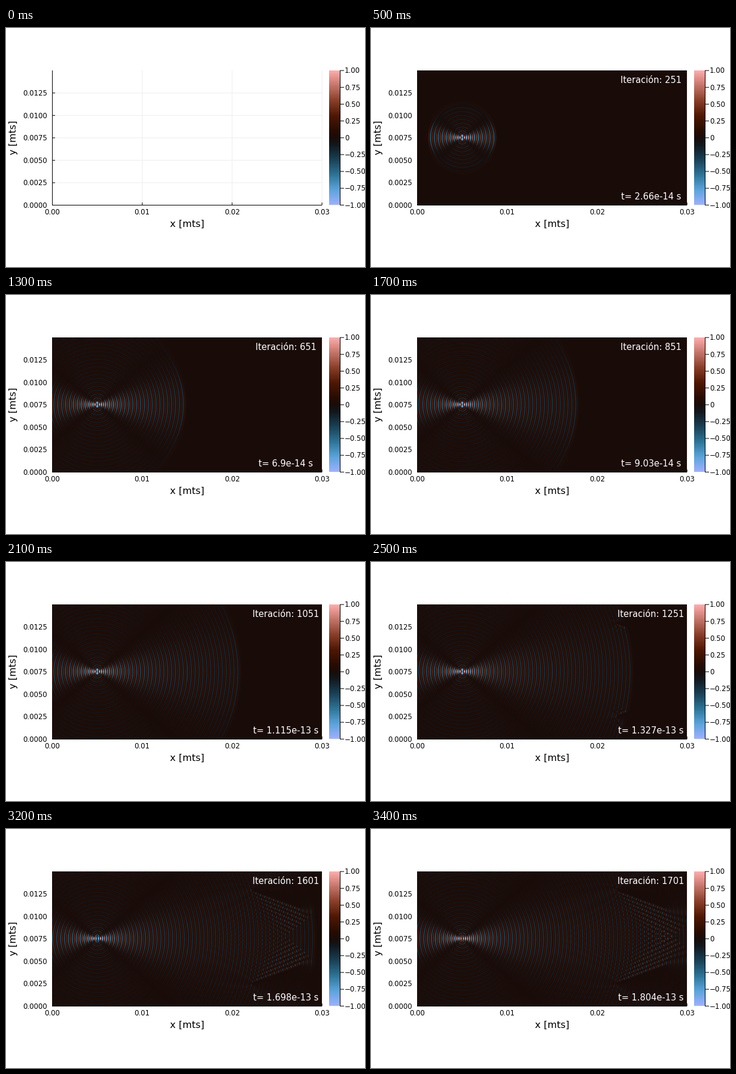
Animation of 600 by 400 pixels, one loop 3.5 s. Source, as a matplotlib script:

```python
import math

import numpy as np
import matplotlib.pyplot as plt
from matplotlib.animation import FuncAnimation
from matplotlib.colors import LinearSegmentedColormap

W, H, DPI = 600, 400, 100
FRAMES, INTERVAL, STRIDE = 35, 100, 50
LEFT, RIGHT, TOP, BOTTOM = 77, 528, 71, 296

DT = 1.5e-16 / math.sqrt(2)   # seconds per iteration
FREQ = 3.3e14
CELL = 0.5                    # pixels per grid cell
COURANT = 0.453
PAD = 40                      # absorbing margin, in cells
NX, NY = 900, 450
SRC_X, SRC_Y, SRC_HALF = 150, 225, 10

# horn walls in heatmap pixels: x0, y0, x1, y1
WALLS = [(333, 31, 413, 60), (333, 188, 413, 159)]

plt.rcParams["font.family"] = "DejaVu Sans"

STOPS = [(0, "#9eb0ff"), (1 / 9, "#5ba4db"), (2 / 9, "#2d7597"),
         (3 / 9, "#1a4256"), (4 / 9, "#11191e"), (0.5, "#190c09"),
         (5 / 9, "#280d01"), (6 / 9, "#501803"), (7 / 9, "#8a3f2a"),
         (8 / 9, "#c4756a"), (1, "#ffacac")]
CMAP = LinearSegmentedColormap.from_list("waves", STOPS, N=256)


def damping():
    """Per-step factor: sponge around the domain, zero on the horn walls."""
    i = np.arange(NX + 2 * PAD)[None, :] - PAD
    j = np.arange(NY + 2 * PAD)[:, None] - PAD
    dx = np.maximum(np.maximum(-i, i - NX + 1), 0)
    dy = np.maximum(np.maximum(-j, j - NY + 1), 0)
    g = np.exp(-(0.01 * np.hypot(dx, dy)) ** 2)
    x, y = (i + 0.5) * CELL, (j + 0.5) * CELL
    for x0, y0, x1, y1 in WALLS:
        wall = y0 + (x - x0) * (y1 - y0) / (x1 - x0)
        g[(np.abs(y - wall) < 0.9) & (x > x0) & (x < x1)] = 0
    return g.astype(np.float32)


def simulate():
    """Fourth-order wave equation driven by a short vertical line source."""
    g = damping()
    rows, cols = g.shape
    u = np.zeros((rows + 4, cols + 4), np.float32)
    prev = np.zeros_like(u)
    s2 = COURANT ** 2
    mid, near, far = 2 - 5 * s2, 4 * s2 / 3, -s2 / 12
    sy, sx = 2 + PAD + SRC_Y, 2 + PAD + SRC_X
    source = (slice(sy - SRC_HALF, sy + SRC_HALF), sx)
    shots = []
    for n in range(1, STRIDE * (FRAMES - 1) + 2):
        # only the columns the wave can have reached
        hi = min(cols, sx + n // 2 + 20)
        v, old = u[:, :hi + 4], prev[:, :hi + 4]
        now, nxt = v[2:-2, 2:-2], old[2:-2, 2:-2]
        ring1 = v[1:-3, 2:-2] + v[3:-1, 2:-2]
        ring1 += v[2:-2, 1:-3]
        ring1 += v[2:-2, 3:-1]
        ring2 = v[:-4, 2:-2] + v[4:, 2:-2]
        ring2 += v[2:-2, :-4]
        ring2 += v[2:-2, 4:]
        ring1 *= near
        ring2 *= far
        ring1 += ring2
        ring1 += mid * now
        np.subtract(ring1, nxt, out=nxt)
        prev[source] += 0.15 * math.cos(2 * math.pi * FREQ * DT * n)
        nxt *= g[:, :hi]
        now *= g[:, :hi]
        u, prev = prev, u
        if n % STRIDE == 1:
            shots.append(u[2 + PAD:2 + PAD + NY, 2 + PAD:2 + PAD + NX].copy())
    return shots


fields = simulate()

fig = plt.figure(figsize=(W / DPI, H / DPI), dpi=DPI, facecolor="white")
ax = fig.add_axes([0, 0, 1, 1])
ax.axis("off")


def px(size):
    return size * 72 / DPI


def label(x, y, s, size, ha="center", color="black"):
    """Text whose digits are centred on height y."""
    return ax.text(x, y + 0.364 * size, s, fontsize=px(size), ha=ha,
                   va="baseline", color=color, zorder=6)


def line(x0, y0, x1, y1, color="black", z=2):
    ax.plot([x0, x1], [y0, y1], color=color, lw=px(1), zorder=z,
            solid_capstyle="butt", snap=False)


TICK, GUIDE, NOTE = 11.73, 16.13, 14.67
GRID = "#eeeeee"

for k in range(4):
    x = 77.5 + 150.2 * k
    line(x, TOP, x, BOTTOM, GRID, 1)
    line(x, 292, x, BOTTOM + 0.5)
    label(x, 308, f"{k * 0.01:.2f}", TICK)
for k in range(6):
    y = 296.5 - 37.55 * k
    line(LEFT, y, RIGHT, y, GRID, 1)
    line(LEFT, y, 82, y)
    label(69, y, f"{k * 0.0025:.4f}", TICK, "right")
line(77.5, TOP, 77.5, 297)
line(LEFT, 296.5, RIGHT, 296.5, z=4)

label(303, 327, "x [mts]", GUIDE)
ax.text(17, 183.5, "y [mts]", fontsize=px(GUIDE), rotation=90,
        rotation_mode="anchor", ha="center", va="baseline")

ax.imshow(np.linspace(1, -1, 256)[:, None], cmap=CMAP, vmin=-1, vmax=1,
          extent=(540, 558, BOTTOM, TOP), aspect="auto",
          interpolation="nearest", zorder=2)
line(558.5, TOP, 558.5, BOTTOM + 0.5, z=3)
for k in range(-4, 5):
    y = 183.75 - 28.15 * k
    line(558, y, 565, y, z=3)
    s = f"{k / 4:.2f}".replace("-", "\u2212") if k else "0"
    label(566, y, s, TICK, "left")

image = ax.imshow(fields[0], cmap=CMAP, vmin=-1, vmax=1,
                  extent=(LEFT, RIGHT, BOTTOM, TOP), aspect="auto",
                  interpolation="nearest", zorder=3)
count = label(468, 86.5, "", NOTE, color="white")
clock = label(468, 282, "", NOTE, color="white")
ax.set_xlim(0, W)
ax.set_ylim(H, 0)


def update(k):
    n = STRIDE * k + 1
    image.set_visible(k > 0)
    image.set_data(fields[k])
    count.set_text(f"Iteración: {n}" if k else "")
    clock.set_text(f"t= {round(n * DT, 16)} s" if k else "")
    return image, count, clock


anim = FuncAnimation(fig, update, frames=FRAMES, interval=INTERVAL,
                     repeat=True, repeat_delay=0, blit=False)
plt.show()
```
